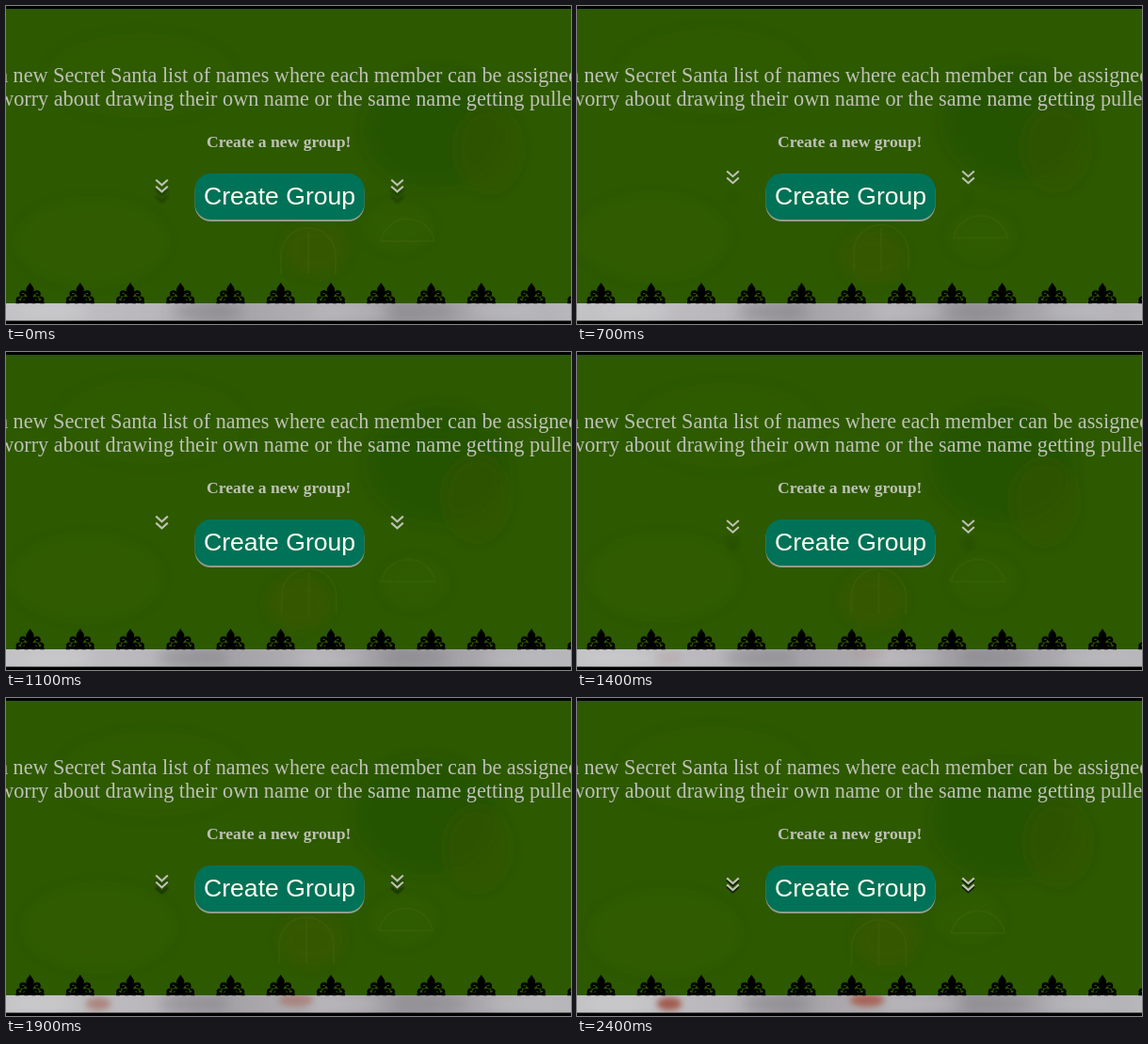
Recreate the animation shown at these times as an HTML page. Size 600x338 px, loop 2.5 s.

```html
<!DOCTYPE html>
<html lang="en">
<head>
<meta charset="utf-8">
<title>Create a new group</title>
<style>
  html, body { margin: 0; width: 100%; height: 100%; overflow: hidden; background: #000; }
  svg { display: block; width: 100vw; height: 100vh; }
  .body { font: 22.2px "Liberation Serif", "Times New Roman", serif; fill: #bfc1b5; }
  .head { font: bold 17.6px "Liberation Serif", "Times New Roman", serif; fill: #bfc1b5; }
  .label { font: 26.6px "Liberation Sans", Arial, sans-serif; fill: #fffff0; }
  .chevron { fill: none; stroke: #bfc1b5; stroke-width: 2.1; }
</style>
</head>
<body>
<svg viewBox="0 0 600 338" preserveAspectRatio="none">
  <defs>
    <filter id="soft" x="-50%" y="-50%" width="200%" height="200%"><feGaussianBlur stdDeviation="7"/></filter>
    <filter id="haze" x="-50%" y="-50%" width="200%" height="200%"><feGaussianBlur stdDeviation="3"/></filter>
    <linearGradient id="snow">
      <stop offset="0" stop-color="#c3c2c4"/>
      <stop offset=".26" stop-color="#b9b7bb"/>
      <stop offset=".38" stop-color="#a3a1a5"/>
      <stop offset=".55" stop-color="#b1afb2"/>
      <stop offset=".7" stop-color="#9b999e"/>
      <stop offset=".85" stop-color="#aaa8ad"/>
      <stop offset="1" stop-color="#b8b7ba"/>
    </linearGradient>
    <clipPath id="strip"><rect y="315" width="600" height="19.5"/></clipPath>
    <clipPath id="panel"><rect y="3" width="600" height="313"/></clipPath>
    <path id="arrow" d="M-6.3-6.4 0-.7 6.3-6.4M-6.3 .6 0 6.3 6.3 .6"/>
    <g id="ornament">
      <path d="M0-22C2-18 5-17 4-13L2-9H-2L-4-13C-5-17-2-18 0-22Z"/>
      <path id="scroll" d="M1-9C2-3 7 0 12-2C15-4 13-7 10-6M2-8C4-13 10-14 10-10C10-8 7-8 7-10M3-4C5-7 9-6 8-3M0-9V0M2-1H6M11-1H15" fill="none" stroke="#000" stroke-width="2.6"/>
      <use href="#scroll" transform="scale(-1 1)"/>
      <path d="M0-9 4-4 2 0H-2L-4-4Z"/>
    </g>
  </defs>

  <rect width="600" height="338"/>
  <g clip-path="url(#strip)">
    <rect y="315" width="600" height="20" fill="url(#snow)"/>
    <g id="clouds" filter="url(#soft)"></g>
    <g id="glows" filter="url(#haze)">
      <ellipse cx="98" cy="325" rx="13" ry="7" fill="#a05b50"/>
      <ellipse cx="308" cy="321" rx="18" ry="7" fill="#a76558"/>
    </g>
  </g>

  <rect y="3" width="600" height="313" fill="#2d5900"/>
  <g clip-path="url(#panel)">
    <g id="shades" filter="url(#soft)"></g>
    <g id="rings" fill="none" stroke="#557315" stroke-opacity=".2" stroke-width="2">
      <path d="M398 247A29 29 0 0 1 455 247Z"/>
      <path d="M292 282V262A28 28 0 0 1 350 262V282M321 236V282"/>
    </g>
  </g>

  <g id="border"></g>

  <g class="body">
    <text x="-7.8" y="80.5">a new Secret Santa list of names where each member can be assigned</text>
    <text x="-7.8" y="106">worry about drawing their own name or the same name getting pulled</text>
  </g>
  <text class="head" x="213" y="150">Create a new group!</text>

  <rect x="200.5" y="180" width="180" height="49" rx="17" fill="#929d8b"/>
  <rect x="200.5" y="178" width="180" height="49" rx="17" fill="#007257"/>
  <text class="label" x="210" y="211">Create Group</text>

  <g id="arrows"></g>
</svg>
<script>
const LOOP = 2500, STEP = 100, SWING = 1500, LEAD = 375;
const TOP = 181, DROP = 17;
const el = id => document.getElementById(id);

function add(parent, name, attrs) {
  const node = document.createElementNS("http://www.w3.org/2000/svg", name);
  for (const key in attrs) node.setAttribute(key, attrs[key]);
  parent.append(node);
  return node;
}

// CSS "ease": cubic-bezier(.25, .1, .25, 1)
function ease(x) {
  const curve = (u, a, b) => 3 * u * (1 - u) ** 2 * a + 3 * u * u * (1 - u) * b + u ** 3;
  let lo = 0, hi = 1;
  for (let i = 0; i < 24; i++) {
    const mid = (lo + hi) / 2;
    if (curve(mid, .25, .25) < x) lo = mid; else hi = mid;
  }
  return curve(lo, .1, 1);
}

for (let i = 0; i < 12; i++)
  add(el("border"), "use", { href: "#ornament", x: 25.5 + i * 53.25, y: 316 });

const shades = [
  [455, 125, 75, 62, "#173f00", .16], [505, 155, 35, 45, "#4b4b00", .13],
  [320, 262, 34, 28, "#665000", .15], [90, 245, 80, 45, "#547600", .1],
  [150, 75, 100, 45, "#547600", .08], [425, 240, 35, 25, "#426b16", .12]
].map(([cx, cy, rx, ry, fill, opacity]) =>
  ({ cx, cy, node: add(el("shades"), "ellipse", { cx, cy, rx, ry, fill, opacity }) }));

const clouds = [[50, "#d6d5d7"], [205, "#77747d"], [355, "#c8c6c9"], [440, "#817e86"], [540, "#c6c5c8"]]
  .map(([cx, fill]) => ({ cx, node: add(el("clouds"), "ellipse", { cx, cy: 325, rx: 38, ry: 9, fill, opacity: .45 }) }));

const arrows = [165.5, 415.5].map(x => {
  const group = add(el("arrows"), "g", { class: "chevron" });
  return {
    x,
    shadow: add(group, "use", { href: "#arrow" }),
    mark: add(group, "use", { href: "#arrow" })
  };
});

function draw(time) {
  const phase = (time + LEAD) / SWING;
  const eased = ease(phase % 1);
  const height = phase < 1 ? eased : 1 - eased;
  const y = TOP + DROP * (1 - height);

  for (const { x, shadow, mark } of arrows) {
    mark.setAttribute("transform", `translate(${x} ${y})`);
    shadow.setAttribute("transform", `translate(${x} ${y + 2 + 21 * height})`);
    shadow.style.cssText = `stroke:#000;opacity:${.65 * (1 - height)};filter:blur(${.6 + 3 * height}px)`;
  }

  const turn = time / LOOP * 2 * Math.PI;
  shades.forEach(({ cx, cy, node }, i) => {
    node.setAttribute("cx", cx + 9 * Math.sin(turn + i));
    node.setAttribute("cy", cy + 6 * Math.cos(turn + 2 * i));
  });
  clouds.forEach(({ cx, node }, i) => node.setAttribute("cx", cx + 12 * Math.sin(turn + i)));
  const glow = Math.max(0, (time - 1300) / 1100);
  el("glows").setAttribute("opacity", Math.min(1, glow));
  el("rings").setAttribute("transform", `translate(${2 * Math.sin(turn)} ${3 * Math.cos(turn)})`);
}

const start = performance.now();
function tick() {
  const time = (performance.now() - start) % LOOP;
  draw(Math.floor(time / STEP) * STEP);
  requestAnimationFrame(tick);
}
tick();
</script>
</body>
</html>
```
